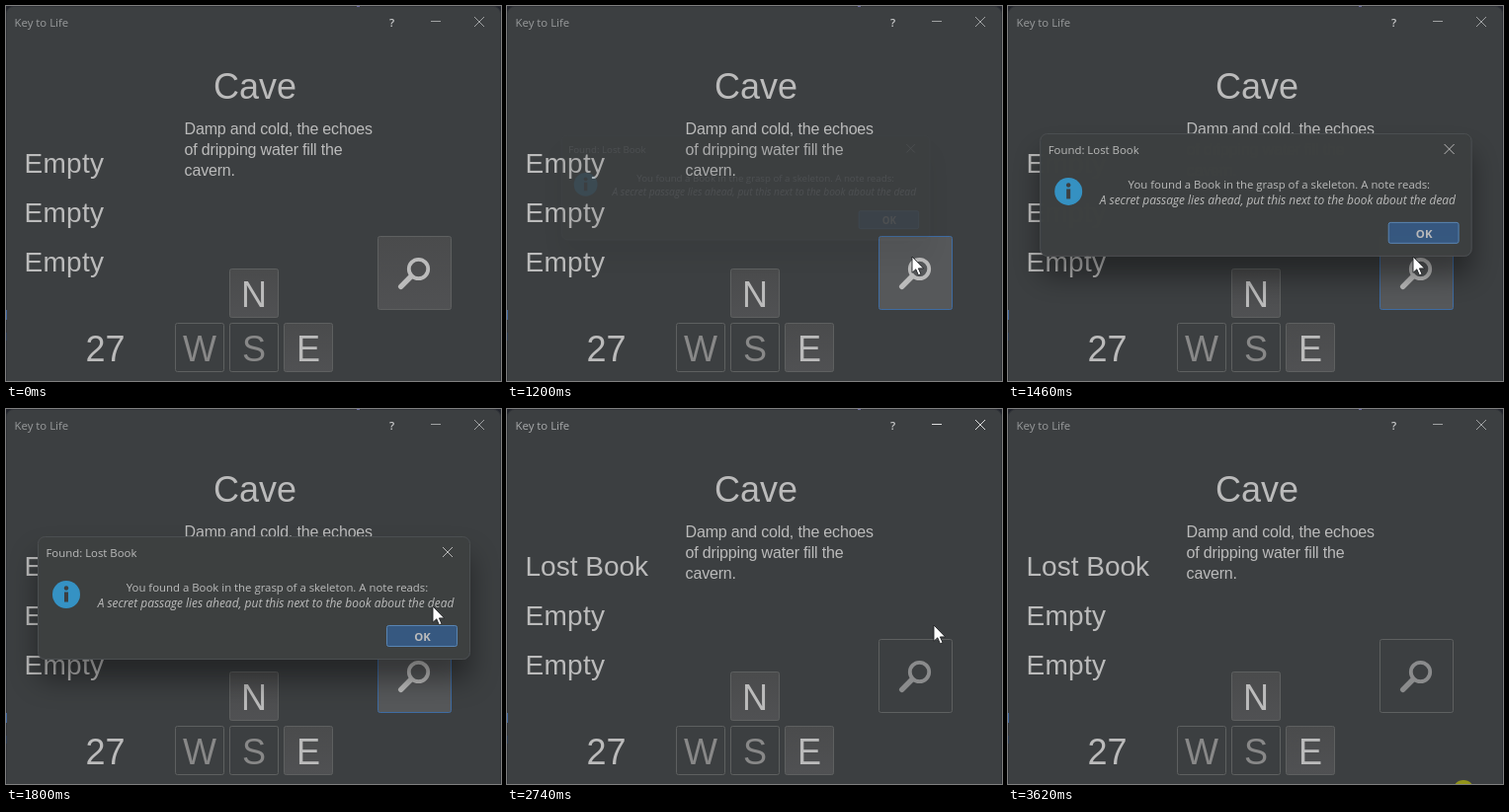
Animation, 501 px wide and 380 px high, one loop 3680 ms. Source, as an HTML page:

```html
<!DOCTYPE html>
<html lang="en">
<head>
<meta charset="utf-8">
<title>Key to Life</title>
<style>
  html, body { margin: 0; width: 100%; height: 100%; overflow: hidden; background: #22242c; }
  svg { display: block; width: 501px; height: 380px; }
  text { fill: #bbb; font-family: "Liberation Sans", Arial, sans-serif; white-space: pre; }
  .big { font-size: 36px; }
  .mid { text-anchor: middle; }
  .item { font-size: 28px; }
  .desc { font-size: 16px; letter-spacing: -.18px; }
  .ui { font-family: "Open Sans", "Noto Sans", sans-serif; font-size: 11.4px; }
  .note { font-size: 12px; font-style: italic; }
  .btn { fill: url(#face); stroke: #5e6060; }
  .off .btn { fill: #3c3f41; }
  .off text { fill: #888; }
  .line { fill: none; stroke: #bbb; }
  #bar text { fill: #999b9c; }
  #bar .line { stroke: #a0a2a3; }
  #bar.active text { fill: #a9abac; }
  #bar.active .line { stroke: #dcdddd; }
  #bar .help, #bar.active .help { fill: #c8c9ca; font-weight: 600; }
  #search { color: #bbb; }
  #search.hover .btn { fill: #56585a; stroke: #3f6ca3; }
  #search.down .btn { fill: #5c5e60; }
  #search.off { color: #8a8b8c; }
  #ok rect { fill: #365880; stroke: #5b87b5; }
  #ok.down rect { fill: #3d6593; }
  #ok.down text { fill: #a9b0b8; }
</style>
</head>
<body>
<svg viewBox="0 0 501 380">
  <defs>
    <linearGradient id="face" x2="0" y2="1">
      <stop stop-color="#4a4b4c"/><stop offset="1" stop-color="#505153"/>
    </linearGradient>
    <filter id="shadow" x="-15%" y="-40%" width="130%" height="220%">
      <feDropShadow dx="0" dy="20" stdDeviation="14" flood-color="#000" flood-opacity=".4"/>
    </filter>
  </defs>

  <rect x=".5" y=".5" width="500" height="390" rx="7" fill="#3c3f41" stroke="#303338"/>
  <rect x="355" width="3" height="1" fill="#65659a"/>
  <rect y="308" width="1" height="10" fill="#3e639c"/>
  <rect y="331" width="1" height="8" fill="#2b3a52"/>

  <g id="bar">
    <text class="ui" x="8.5" y="21">Key to Life</text>
    <text class="ui mid help" x="390.5" y="21">?</text>
    <path class="line" d="M430 15.5h10"/>
    <path class="line" d="M474 11l10 10m0-10l-10 10"/>
  </g>

  <text class="big mid" x="252" y="94">Cave</text>
  <g class="desc">
    <text x="180.6" y="130">Damp and cold, the echoes</text>
    <text x="180.6" y="151">of dripping water fill the</text>
    <text x="180.6" y="172">cavern.</text>
  </g>
  <g class="item">
    <text id="slot" x="18.5" y="169">Empty</text>
    <text x="18.5" y="219" letter-spacing=".3">Empty</text>
    <text x="18.5" y="269" letter-spacing=".3">Empty</text>
  </g>
  <text class="big" x="80.5" y="360">27</text>
  <g id="pad"></g>

  <g id="search">
    <rect class="btn" x="376.5" y="233.5" width="74" height="74" rx="2"/>
    <g fill="none" stroke="currentColor" stroke-linecap="round">
      <circle cx="417.5" cy="266.5" r="9.7" stroke-width="3.8"/>
      <path d="M410 274l-10.3 10.3" stroke-width="5.4"/>
    </g>
  </g>

  <g id="dialog">
    <rect x="32.5" y="129.5" width="437" height="124" rx="7" fill="#3c3f41" stroke="#4d5052" filter="url(#shadow)"/>
    <text class="ui" x="40.5" y="150">Found: Lost Book</text>
    <path class="line" d="M442 140l10 10m0-10l-10 10"/>
    <circle cx="61" cy="188" r="14" fill="#3592c4"/>
    <circle cx="61" cy="181.5" r="2.2" fill="#3c3f41"/>
    <rect x="59" y="185.5" width="4" height="10" fill="#3c3f41"/>
    <text class="ui mid" x="274.5" y="185">You found a Book in the grasp of a skeleton. A note reads:</text>
    <text class="ui mid note" x="273" y="201">A secret passage lies ahead, put this next to the book about the dead</text>
    <g id="ok">
      <rect x="385.5" y="219.5" width="71" height="21" rx="2"/>
      <text class="ui mid" x="421.5" y="235" font-weight="700">OK</text>
    </g>
  </g>

  <circle id="spot" cx="461" cy="387" r="11" fill="#92941a"/>
  <path id="cursor" d="M0 0V16.3L3.8 12.8 6.4 18.8 9 17.7 6.4 11.9H11.6Z" fill="#fff" stroke="#202224" stroke-width=".9"/>
</svg>
<script>
const LOOP = 3680;
const STEP = 1000 / 15; // the screen refreshes 15 times a second
const OPEN = 1200, CLOSE = 2670, CLOSED = 2740;
const PIVOT = { x: 187, y: 140 };

// The pointer glides to each stop and rests there; it starts and ends below the stage.
const HOME = { x: 436, y: 400 };
const STOPS = [
  { from: 133, to: 400, x: 410, y: 254 },
  { from: 1533, to: 1800, x: 432, y: 200 },
  { from: 1867, to: 2133, x: 432, y: 219 },
  { from: 2800, to: 3133, x: 448, y: 356 },
  { from: 3133, to: 3400, x: 452, y: 392 }
];

const $ = id => document.getElementById(id);
const within = (t, a, b) => t >= a && t < b;
const clamp = v => Math.min(1, Math.max(0, v));
const easeOut = p => 1 - (1 - p) ** 2;
const snap = t => Math.floor((t + 10) / STEP) * STEP;

const padButton = (name, x, y, off) => `
  <g class="${off ? 'off' : ''}">
    <rect class="btn" x="${x + .5}" y="${y + .5}" width="49" height="49" rx="2"/>
    <text class="big mid" x="${x + 25}" y="${y + 39}">${name}</text>
  </g>`;

$('pad').innerHTML = padButton('N', 226, 266) +
  [...'WSE'].map((name, i) => padButton(name, 171 + 55 * i, 321, name !== 'E')).join('');

function pointerAt(t) {
  return STOPS.reduce((pos, stop) => {
    const p = easeOut(clamp((t - stop.from) / (stop.to - stop.from)));
    return { x: pos.x + (stop.x - pos.x) * p, y: pos.y + (stop.y - pos.y) * p };
  }, HOME);
}

// 0 when the dialog is fully there, 1 when it is gone.
function dialogFade(t) {
  if (!within(t, OPEN, CLOSED)) return 1;
  if (t >= CLOSE) return .65;
  return .87 * Math.exp((OPEN - snap(t)) / 58);
}

function draw(t) {
  const { x, y } = pointerAt(snap(t));
  $('cursor').setAttribute('transform', `translate(${Math.round(x)} ${Math.round(y)})`);

  const fade = dialogFade(t), shrink = .17 * fade;
  $('dialog').setAttribute('opacity', 1 - fade);
  $('dialog').setAttribute('transform',
    `translate(${PIVOT.x * shrink} ${PIVOT.y * shrink}) scale(${1 - shrink})`);

  const taken = t >= CLOSED;
  $('slot').textContent = taken ? 'Lost Book' : 'Empty';
  $('slot').setAttribute('letter-spacing', taken ? 0 : .3);

  const search = $('search').classList;
  search.toggle('hover', within(t, 330, CLOSED));
  search.toggle('down', within(t, 860, 1000));
  search.toggle('off', taken);

  $('ok').classList.toggle('down', t >= 2280);
  $('bar').classList.toggle('active', within(t, 860, OPEN) || within(t, CLOSE, 3620));
  $('spot').setAttribute('visibility', t >= 3620 ? 'visible' : 'hidden');
}

const start = performance.now();
function tick() {
  draw((performance.now() - start) % LOOP);
  requestAnimationFrame(tick);
}
tick();
</script>
</body>
</html>
```
